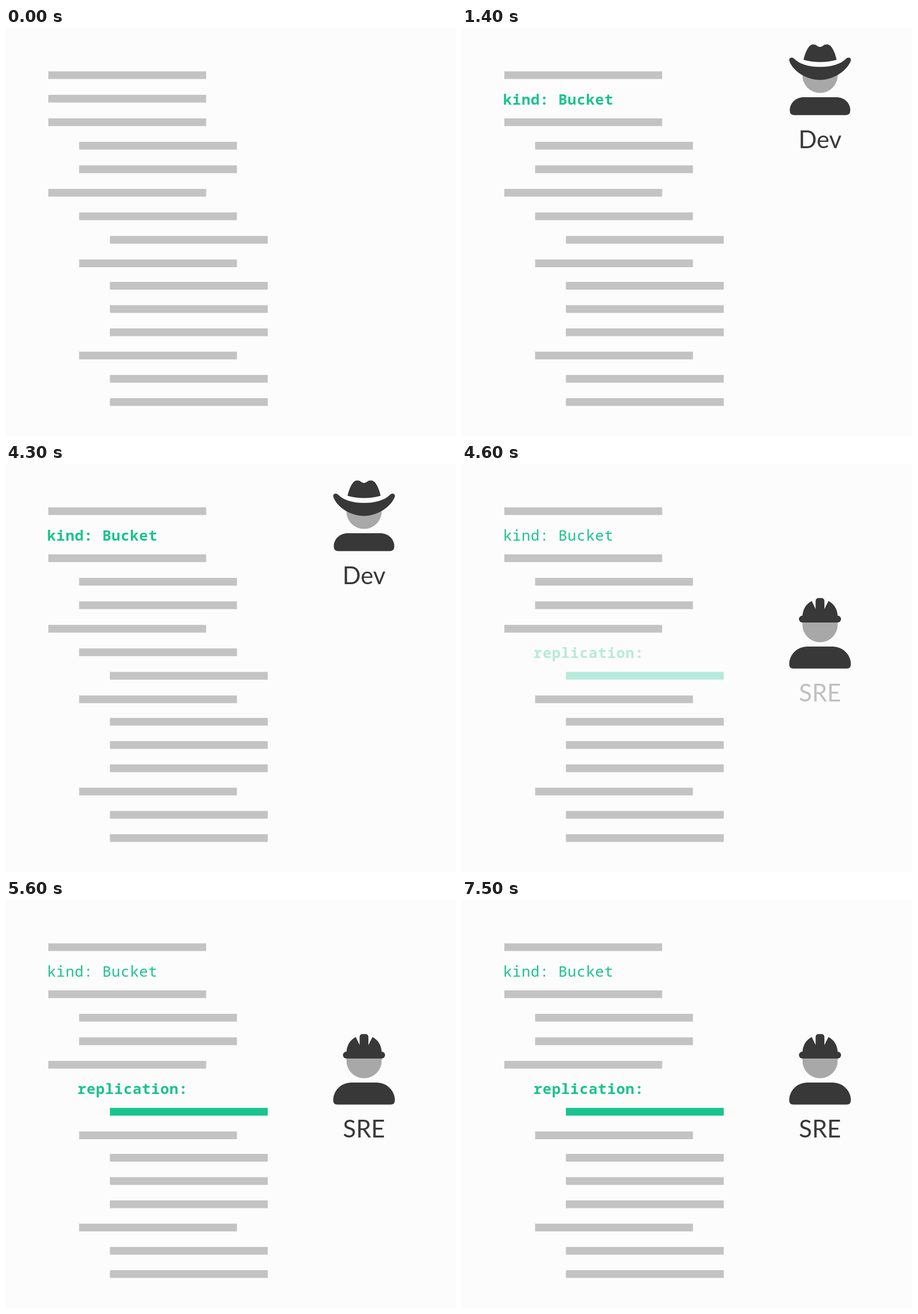
Write an HTML page that moves like this. It is 786 by 713 pixels and loops after 8000 ms.

```html
<!DOCTYPE html>
<html lang="en">
<head>
<meta charset="utf-8">
<title>Roles and resources</title>
<style>
  html, body { margin: 0; width: 100%; height: 100%; overflow: hidden; background: #fcfcfc; }
  svg { display: block; width: 100%; height: 100%; }
  .bar { fill: #c3c3c3; }
  .green { fill: #19c38f; }
  .dark { fill: #383838; }
  .head { fill: #a8a8a8; }
  .code { font: 25.6px "Noto Sans Mono", monospace; letter-spacing: .72px; white-space: pre; }
  .bold { font-weight: 700; }
  .label { font: 42px Lato, sans-serif; text-anchor: middle; }
</style>
</head>
<body>
<svg viewBox="0 0 786 713">
  <g id="bars"></g>

  <text id="kind" class="code green" x="71.8" y="133.6">kind: Bucket</text>
  <g id="replication" class="green">
    <text class="code bold" x="124.8" y="339.2">replication:</text>
    <rect x="181.5" y="363.3" width="275.7" height="13.5"/>
  </g>

  <g id="dev" class="dark">
    <path class="head" d="M594.6 78V82.7A30.8 30.8 0 0 0 656.2 82.7V78Z"/>
    <path d="M596.5 55.5C599 45 603 35 608 30.8C612 27.8 617 28.5 620 31C623.5 33.7 627 33.7 630.5 31C634 28.3 639 27.8 643 30.8C648 35 652 45 654.3 55.5C637 60.8 614 60.8 596.5 55.5Z"/>
    <path d="M571.6 57C570.8 51.5 577 50 580.5 54C590 63.5 606 68 625.3 68C645 68 661 63.5 670.5 54C674 50 680 51.5 679.2 57C673 74 650 90.7 625.3 90.7C600 90.7 577 74 571.6 57Z"/>
    <path d="M572.5 144C572.5 131 583 121 597 121H653.5C668 121 678.2 131 678.2 144Q678.2 152.2 670 152.2H580.5Q572.5 152.2 572.5 144Z"/>
    <text id="devLabel" class="label" x="625.3" y="209.5">Dev</text>
  </g>

  <g id="sre" class="dark">
    <path class="head" d="M594.6 275V280.7A30.8 30.8 0 0 0 656.2 280.7V275Z"/>
    <path d="M594.6 267C595 254 601 244.5 611 239.6L617.6 253.5V240Q617.6 234.3 623 234.3H627.6Q633 234.3 633 240V253.5L640 239.6C650 244.5 656 254 656.2 267Z"/>
    <rect x="588.5" y="264.9" width="73.6" height="12" rx="6"/>
    <path d="M571.5 350C571.5 333 585.5 319 603.5 319H647C665 319 679.2 333 679.2 350Q679.2 357.4 672 357.4H578.7Q571.5 357.4 571.5 350Z"/>
    <text id="sreLabel" class="label" x="625.3" y="414.7">SRE</text>
  </g>
</svg>

<script>
const LOOP = 8000, STEP = 100, FADE = 1000;
const DEV_AT = 500, SRE_AT = 4400;

const $ = id => document.getElementById(id);
const show = (el, on) => { el.style.display = on ? "" : "none"; };
const fade = (t, start) => Math.min(1, Math.max(0, (t - start + STEP) / FADE));

const indents = [0, 0, 0, 1, 1, 0, 1, 2, 1, 2, 2, 2, 1, 2, 2];
const bars = indents.map((indent, i) => {
  const bar = document.createElementNS("http://www.w3.org/2000/svg", "rect");
  const y = i < 9 ? 75.7 + i * 41.1 : 443.7 + (i - 9) * 40.65;
  const attrs = { class: "bar", x: 73.9 + indent * 53.8, y, width: 275.7, height: 13.5 };
  for (const name in attrs) bar.setAttribute(name, attrs[name]);
  return $("bars").appendChild(bar);
});

function draw(t) {
  const sre = t >= SRE_AT;
  const dev = t >= DEV_AT && !sre;
  const devFade = fade(t, DEV_AT), sreFade = fade(t, SRE_AT);

  show($("dev"), dev);
  show($("sre"), sre);
  show($("kind"), dev || sre);
  show($("replication"), sre);
  show(bars[1], !dev && !sre);
  show(bars[6], !sre);
  show(bars[7], !sre);

  $("kind").style.fontWeight = sre ? 400 : 700;
  $("kind").style.opacity = devFade;
  $("devLabel").style.opacity = devFade;
  $("replication").style.opacity = sreFade;
  $("sreLabel").style.opacity = sreFade;
}

function tick() {
  const t = performance.now() % LOOP;
  draw(Math.floor(t / STEP) * STEP);
  requestAnimationFrame(tick);
}
tick();
</script>
</body>
</html>
```
